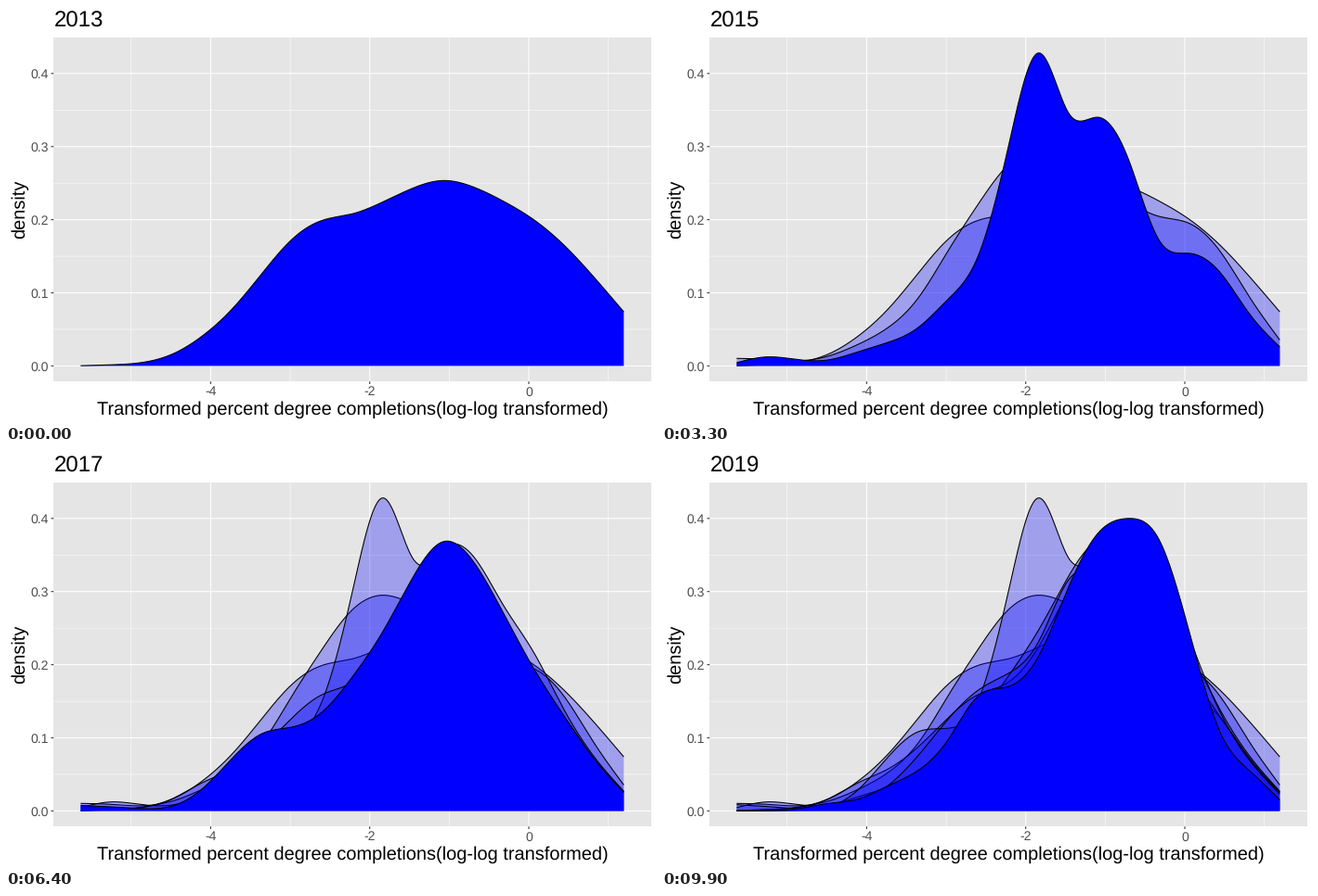
Write a matplotlib script that moves like this. It is 700 by 450 pixels and loops after 10 s.

```python
import numpy as np
import matplotlib.pyplot as plt
from matplotlib.animation import FuncAnimation

plt.rcParams["font.family"] = "Liberation Sans"
plt.rcParams["text.hinting"] = "no_hinting"

W, H, DPI = 700, 450, 100
FRAMES, STEP = 100, 100
PX = 72 / DPI  # points per pixel
LEFT, RIGHT, TOP, BOTTOM = 51.3, 694.5, 33.5, 405.2
FIRST, LAST = 2013, 2019

# Density of each year (thousandths) at evenly spaced x positions
KNOTS = np.array([
    [0.3, 1.5, 4.5, 15.5, 40, 77, 126, 173, 199, 208, 224, 243, 253.5, 245, 225.5, 200.5, 166, 122, 74],
    [10.3, 9, 7, 13, 29, 52, 92, 157, 221, 275, 295, 283, 259, 226, 204.5, 195, 158, 94, 35.5],
    [4.5, 12.3, 8.8, 8, 19, 32, 52, 91, 150, 299, 428, 346, 340, 281, 172, 154, 129, 71, 26],
    [0.5, 2, 5, 16, 38, 57, 87, 127, 159, 176, 224, 302, 361, 349, 282, 218, 140, 75, 27],
    [8.5, 6, 3, 5, 28, 73, 108, 113, 132, 184, 247, 321, 369, 341, 270, 193, 130, 72, 25],
    [0, 0, 1, 3.5, 11, 34, 75, 125, 165, 188, 231, 316, 332, 341, 328, 237, 137, 69, 23],
    [0, 0.5, 3, 10, 16, 34, 55, 97, 157, 170, 211, 306, 381, 400, 371, 245, 110, 55, 15],
]) / 1000


def px(x):
    return 563 + 85.65 * x


def py(y):
    return 388.4 - 789 * y


def spline(y, u):
    """Natural cubic spline through unit-spaced values y."""
    n = len(y)
    a = np.eye(n)
    b = np.zeros(n)
    for k in range(1, n - 1):
        a[k, k - 1:k + 2] = 1, 4, 1
        b[k] = 6 * (y[k - 1] - 2 * y[k] + y[k + 1])
    m = np.linalg.solve(a, b)
    k = np.minimum(u.astype(int), n - 2)
    t = u - k
    s = 1 - t
    return (s * y[k] + t * y[k + 1]
            + ((s**3 - s) * m[k] + (t**3 - t) * m[k + 1]) / 6)


N = 512
xs = np.linspace(80.4, 665.3, N)
u = np.linspace(0, KNOTS.shape[1] - 1, N)
curves = np.array([np.maximum(spline(row, u), 0) for row in KNOTS])
# 1-based frame of each year, halves rounded to even
keys = np.round(np.arange(LAST - FIRST + 1) * (FRAMES - 1) / (LAST - FIRST) + 1) - 1

fig = plt.figure(figsize=(W / DPI, H / DPI), dpi=DPI, facecolor="white")
ax = fig.add_axes([0, 0, 1, 1])
ax.set(xlim=(0, W), ylim=(H, 0))
ax.axis("off")


def line(x, y, color, width, z):
    return ax.plot(x, y, color=color, lw=width * PX, zorder=z, snap=False,
                   solid_capstyle="butt", solid_joinstyle="round")[0]


def text(x, y, s, size, color="black", ha="center", **kw):
    return ax.text(x, y, s, fontsize=size * PX, color=color, ha=ha,
                   va="baseline", **kw)


def vgrid(x, width):
    line([px(x)] * 2, [TOP, BOTTOM], "white", width, 1)


def hgrid(y, width):
    line([LEFT, RIGHT], [py(y)] * 2, "white", width, 1)


def area(z, alpha):
    fill, = ax.fill(xs, xs, color="blue", alpha=alpha, lw=0, zorder=z)
    return fill, line(xs, xs, "black", 1.07, z + 0.5)


def shape(parts, dens):
    fill, edge = parts
    y = py(dens)
    fill.set_xy(np.column_stack([np.r_[xs, xs[::-1]],
                                 np.r_[y, np.full(N, py(0))]]))
    edge.set_ydata(y)


ax.fill([LEFT, RIGHT, RIGHT, LEFT], [TOP, TOP, BOTTOM, BOTTOM],
        color="#e5e5e5", lw=0, zorder=0)
for x in (-5, -3, -1, 1):
    vgrid(x, 0.53)
for y in (0.05, 0.15, 0.25, 0.35):
    hgrid(y, 0.53)
for x in (-4, -2, 0):
    vgrid(x, 1.07)
    line([px(x)] * 2, [BOTTOM, BOTTOM + 2.75], "#333333", 1.07, 1)
    text(px(x), 420.5, str(x), 14, "#4d4d4d")
for y in (0, 0.1, 0.2, 0.3, 0.4):
    hgrid(y, 1.07)
    line([LEFT - 2.75, LEFT], [py(y)] * 2, "#333333", 1.07, 1)
    text(46.3, py(y) + 5, f"{y:.1f}", 14, "#4d4d4d", "right")

text((LEFT + RIGHT) / 2, 440.5,
     "Transformed percent degree completions(log-log transformed)", 20)
text(19.7, (TOP + BOTTOM) / 2, "density", 20, rotation=90,
     rotation_mode="anchor")
title = text(LEFT, 22.8, "", 24, ha="left")

shadows = [area(2 + k, 0.3) for k in range(len(keys) - 1)]
for parts, dens in zip(shadows, curves):
    shape(parts, dens)
current = area(20, 1)


def draw(i):
    for key, parts in zip(keys, shadows):
        for p in parts:
            p.set_visible(i > key)
    k = min(np.searchsorted(keys, i, side="right") - 1, len(keys) - 2)
    t = (i - keys[k]) / (keys[k + 1] - keys[k])
    shape(current, (1 - t) * curves[k] + t * curves[k + 1])
    year = FIRST + i * (LAST - FIRST) / (FRAMES - 1)
    title.set_text(str(int(year + 0.5)))
    return [title, *current]


anim = FuncAnimation(fig, draw, frames=FRAMES, interval=STEP, repeat=True,
                     repeat_delay=0, blit=False)
plt.show()
```
